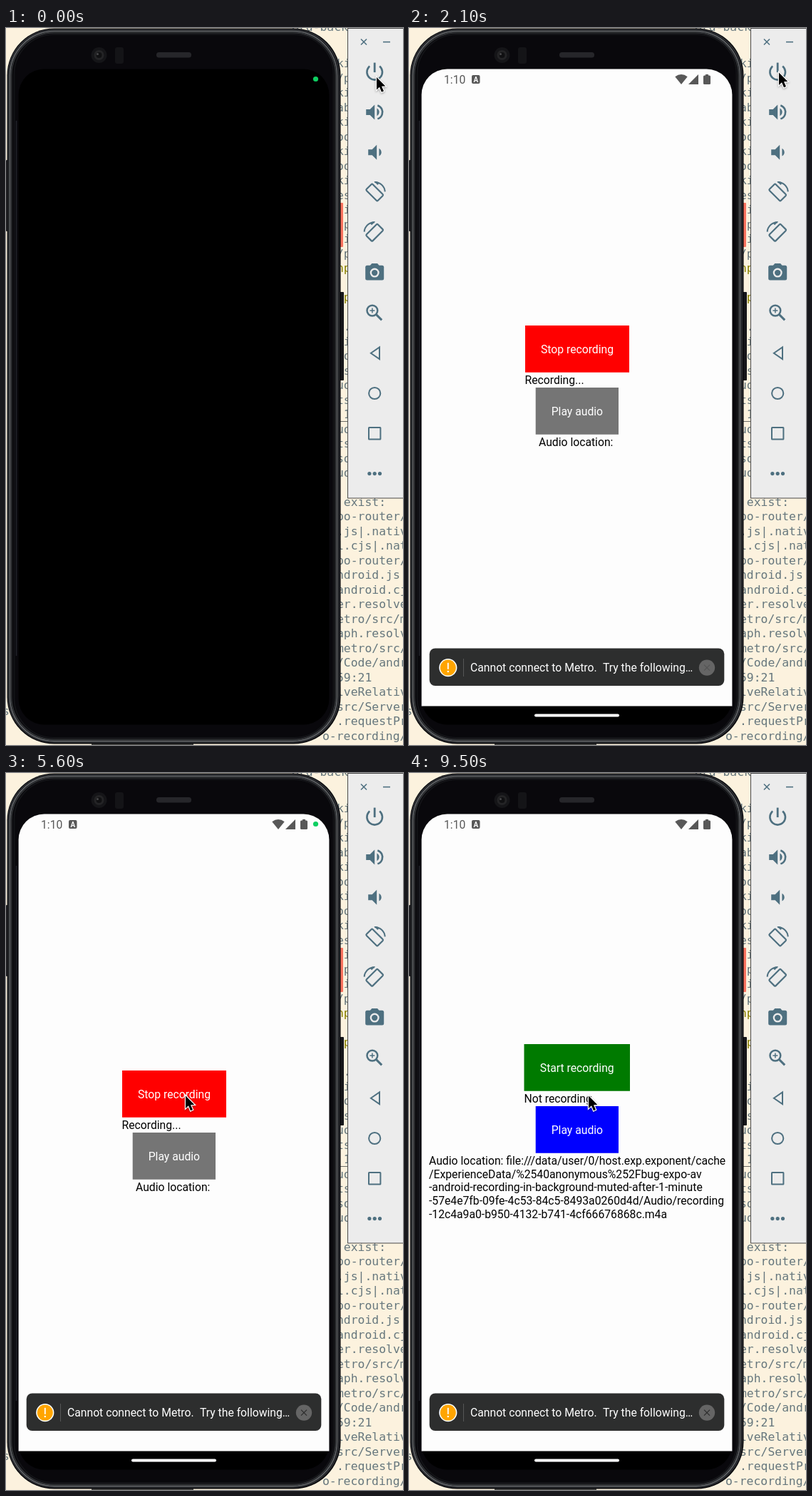
Recreate the animation shown at these times as an HTML page with a canvas. Size 557 by 1005 pixels, loop 9600 ms.

```html
<!DOCTYPE html>
<html lang="en">
<head>
<meta charset="utf-8">
<title>Recording in background</title>
<style>
html, body { margin: 0; width: 100%; height: 100%; overflow: hidden; background: #fcf2de; }
canvas { display: block; width: 557px; height: 1005px; }
</style>
</head>
<body>
<canvas id="stage"></canvas>
<script>
const W = 557, H = 1005, LOOP = 9600;
const SANS = 'Roboto, sans-serif', MONO = '"DejaVu Sans Mono", monospace';
const INK = '#4e7080', PANEL = '#ececec';
const canvas = document.getElementById('stage');
const dpr = window.devicePixelRatio || 1;
canvas.width = W * dpr;
canvas.height = H * dpr;
const c = canvas.getContext('2d');

function box(x, y, w, h, color, r = 0) {
  c.fillStyle = color;
  c.beginPath();
  c.roundRect(x, y, w, h, r);
  c.fill();
}
function frame(x, y, w, h, color, width, r = 0) {
  c.strokeStyle = color;
  c.lineWidth = width;
  c.beginPath();
  c.roundRect(x, y, w, h, r);
  c.stroke();
}
function disc(x, y, r, color) {
  c.fillStyle = color;
  c.beginPath();
  c.arc(x, y, r, 0, 7);
  c.fill();
}
function arc(x, y, r, from, to, color, width) {
  c.strokeStyle = color;
  c.lineWidth = width;
  c.beginPath();
  c.arc(x, y, r, from, to);
  c.stroke();
}
function trace(pts) {
  c.beginPath();
  for (let i = 0; i < pts.length; i += 2) c.lineTo(pts[i], pts[i + 1]);
}
function line(pts, color, width) {
  trace(pts);
  c.strokeStyle = color;
  c.lineWidth = width;
  c.stroke();
}
function shape(pts, color) {
  trace(pts);
  c.closePath();
  c.fillStyle = color;
  c.fill();
}
function cross(x, y, r, color, width) {
  line([x - r, y - r, x + r, y + r], color, width);
  line([x - r, y + r, x + r, y - r], color, width);
}
function write(s, x, y, color, font = '15.72px ' + SANS, align = 'left') {
  c.font = font;
  c.textAlign = align;
  c.fillStyle = color;
  c.fillText(s, x, y);
}
function at(x, y, draw) {
  c.save();
  c.translate(x, y);
  draw();
  c.restore();
}

const PITCH = 20.5, COL = 464;
const edge = 'ki,/p,ki,ab,ki,oo,ki,oo,ki,es, i, p, i,/p,np,, p,, .,ti,so, s,uo,ts, 1,uo,ts,so,uo,'.split(',');
const log = [' exist:', 'po-router/', '.js|.nativ', 'l.cjs|.nat', 'po-router/', 'ndroid.js|',
  'android.cj', 'er.resolve', 'etro/src/m', 'aph.resolv', 'metro/src/', '/Code/andr', '59:21',
  'lveRelativ', 'src/Server', '.requestPr'];

function terminal() {
  box(0, 0, W, H, '#fcf2de');
  const ink = '#66777d';
  const mono = (s, x, y, color = ink) => write(s, x, y, color, '16.4px ' + MONO);
  mono('ord-back', 401, 4);
  edge.forEach((s, i) => mono(s, COL, 55 + i * PITCH, i === 14 || i === 16 ? '#8a8200' : ink));
  log.forEach((s, i) => mono(s, COL, 669.5 + i * PITCH));
  mono('o-recording/', COL - 20, 669.5 + 16 * PITCH);
  mono('s', -5, 963);
  box(468, 551, 12, 1, '#6b6b66');
  box(120, 1003, 143, 2, '#4b4b49');
}

function phone() {
  box(467, 370, 7, 124, '#16161a', 1);
  box(468, 245, 5, 62, '#f9735f', 1);
  box(0, 185, 4, 100, '#27272b', 1);
  box(1.5, 0.5, 468, 1003, '#08080b', 66);
  frame(3.5, 2.5, 463.5, 998.5, '#2a2c30', 2, 64);
  frame(5.5, 4.5, 459, 995, '#686b6e', 1.5, 62);
  frame(7.5, 6.5, 455, 991, '#303235', 2, 60);
  frame(11.5, 9, 448, 986, '#131317', 2, 56);
  box(13, 11, 445, 982, '#09080c', 54);
  line([14.5, 130, 14.5, 880], '#222329', 1.5);
  disc(130.5, 38, 11, '#151518');
  disc(130.5, 38, 7, '#242426');
  disc(130.5, 38, 4, '#101012');
  disc(128.5, 36.5, 1.5, '#49494c');
  box(153, 27, 12, 23, '#141417', 3);
  box(211, 34, 49, 7.5, '#26262a', 3.5);
  box(17.6, 57.5, 435.8, 919, '#000', 36);
}

function statusBar() {
  const gray = '#585858';
  write('1:10', 49, 77.8, gray);
  box(88, 66, 11.5, 12, gray, 2);
  write('A', 93.8, 75.6, '#fdfdfd', 'bold 10px ' + SANS, 'center');
  c.fillStyle = gray;
  c.beginPath();
  c.moveTo(382, 79);
  c.lineTo(373.3, 68.3);
  c.quadraticCurveTo(382, 61.8, 390.7, 68.3);
  c.fill();
  shape([392, 79, 406, 79, 406, 65], gray);
  box(413, 66.5, 10, 12.5, gray, 1.5);
  box(416, 65, 4, 2, gray);
}

function button(x, y, w, label, color) {
  box(x, y, w, 65.7, color);
  write(label, x + w / 2, y + 38.8, '#fff', undefined, 'center');
}

const place = ['Audio location: file:///data/user/0/host.exp.exponent/cache',
  '/ExperienceData/%2540anonymous%252Fbug-expo-av',
  '-android-recording-in-background-muted-after-1-minute',
  '-57e4e7fb-09fe-4c53-84c5-8493a0260d4d/Audio/recording',
  '-12c4a9a0-b950-4132-b741-4cf66676868c.m4a'];

function toast(t) {
  box(28.7, 869.5, 413.6, 52.5, '#2d2e2e', 8);
  disc(54.8, 896.6, 12.6, '#fff');
  disc(54.8, 896.6, 11, '#ffa500');
  box(53.9, 889.8, 1.8, 9, '#fff');
  disc(54.8, 902, 1.2, '#fff');
  box(76, 884, 1, 25, '#565656');
  write('Cannot connect to Metro.', 86, 902.4, '#fff');
  write('Try the following…', 272, 902.4, '#fff');
  disc(418, 896.6, 11.2, '#656565');
  cross(418, 896.6, 4, t < 2200 ? '#555' : '#2d2d2d', 1.3);
}

function app(t) {
  box(17.6, 57.5, 435.8, 893, '#fdfdfd', [36, 36, 0, 0]);
  statusBar();
  if (t < 6300) {
    button(163, 417, 146, 'Stop recording', '#f00');
    write('Recording...', 162.5, 499.4, '#000');
    button(177.7, 504, 116.3, 'Play audio', '#757575');
    write('Audio location:', 182, 586.4, '#000');
  } else {
    button(161.5, 380, 148.5, 'Start recording', '#007a00');
    write('Not recording', 161.5, 462.4, '#000');
    button(177.7, 467, 116.3, 'Play audio', '#00f');
    place.forEach((s, i) => write(s, 28, 549.3 + i * 18.55, '#000'));
  }
  toast(t);
  box(176, 961.5, 119, 4, '#fff', 2);
}

function speaker(x) {
  shape([x, -4, x + 5.5, -4, x + 12, -10.5, x + 12, 10.5, x + 5.5, 4, x, 4], INK);
  c.fillStyle = INK;
  c.beginPath();
  c.arc(x + 12.5, 0, 6, -1.1, 1.1);
  c.fill();
}
function rotate(dir) {
  c.scale(dir, 1);
  c.save();
  c.rotate(Math.PI / 4);
  frame(-11.3, -6.2, 22.6, 12.4, INK, 2.2, 1.5);
  c.restore();
  arc(0, 0, 14.6, -Math.PI / 2, -0.08, INK, 2);
  shape([-0.9, -15.6, 4.1, -10.6, 5.8, -12.3, 4, -15], INK);
}

const icons = [
  () => {
    arc(0, 0.2, 10.8, -0.87, Math.PI + 0.87, INK, 2.6);
    box(-1.4, -13, 2.8, 13.5, INK);
  },
  () => {
    speaker(-12);
    arc(1, 0, 10, -1.25, 1.25, INK, 2.6);
  },
  () => speaker(-9),
  () => rotate(1),
  () => rotate(-1),
  () => {
    box(-13, -10.4, 26, 20.8, INK, 2.5);
    shape([-6.5, -10, -3.9, -13, 3.9, -13, 6.5, -10], INK);
    disc(0, 0, 6.5, PANEL);
    disc(0, 0, 4.2, INK);
  },
  () => {
    arc(-3.3, -3.3, 7.4, 0, 7, INK, 2.5);
    line([2, 2, 10, 10], INK, 3);
    line([-6.8, -3.3, 0.2, -3.3], INK, 1.5);
    line([-3.3, -6.8, -3.3, 0.2], INK, 1.5);
  },
  () => {
    trace([-5.3, 0, 6.8, -8.3, 6.8, 8.3]);
    c.closePath();
    c.strokeStyle = INK;
    c.lineWidth = 2;
    c.stroke();
  },
  () => arc(0, 0, 8.1, 0, 7, INK, 2),
  () => frame(-8.2, -8.2, 16.4, 16.4, INK, 2, 0.5),
  () => [-7.3, 0, 7.3].forEach(x => disc(x, 0, 2.6, INK))
];

function panel() {
  box(479, 0, 78, 659.5, '#4a4a4a');
  box(480, 1, 77, 657.5, PANEL);
  cross(502, 19.5, 4, INK, 1.6);
  box(529, 18.8, 10, 1.6, INK);
  icons.forEach((draw, i) => at(517.2, 61.6 + i * 56.3, draw));
}

function ease(t, from, to) {
  const u = Math.min(1, Math.max(0, (t - from) / (to - from)));
  return u * u * (3 - 2 * u);
}
function cursor(t) {
  const lift = ease(t, 300, 700), go = ease(t, 4900, 5550);
  at(520 - lift - 267 * go, 69 - 6.5 * lift + 390 * go, () => {
    trace([0, 0, 0, 17.5, 4, 13.8, 7, 20.8, 10, 19.5, 7, 12.8, 12.3, 12.5]);
    c.closePath();
    c.save();
    c.shadowColor = 'rgba(0,0,0,.35)';
    c.shadowBlur = 3 * dpr;
    c.shadowOffsetY = dpr;
    c.strokeStyle = '#fff';
    c.lineWidth = 2.4;
    c.stroke();
    c.restore();
    c.fillStyle = '#000';
    c.fill();
  });
}

function draw(now) {
  const t = Math.floor((now % LOOP) / 100) * 100;
  c.setTransform(dpr, 0, 0, dpr, 0, 0);
  terminal();
  phone();
  if (t >= 2100) app(t);
  if (t < 1000 || (t >= 2500 && t < 8800)) disc(434.5, 71.5, 3.6, '#0fcf62');
  panel();
  cursor(t);
}

let start;
function tick(now) {
  start ??= now;
  draw(Math.max(0, now - start));
  requestAnimationFrame(tick);
}
draw(0);
requestAnimationFrame(tick);
</script>
</body>
</html>
```
